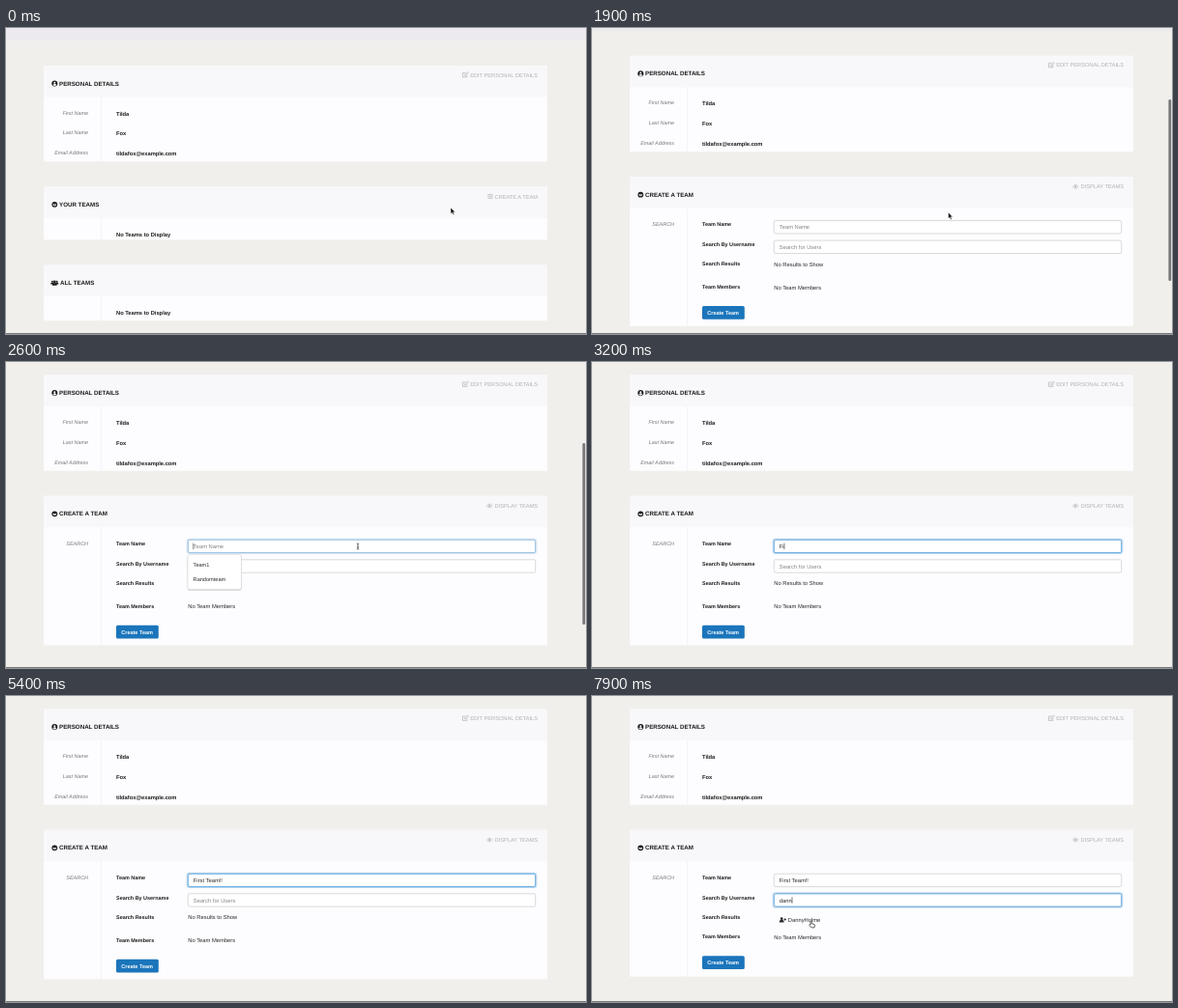
An HTML page for the animation above (8000 ms loop, 600x317 px).

```html
<!DOCTYPE html>
<html lang="en">
<head>
<meta charset="utf-8">
<title>Create a team</title>
<style>
  html, body { margin: 0; width: 100%; height: 100%; overflow: hidden; background: #f0efec; }
  svg { display: block; width: 600px; height: 317px; }
  text { font: 5.8px "Liberation Sans", Arial, sans-serif; fill: #2a2a2a; text-rendering: geometricPrecision; white-space: pre; }
  .head { font-size: 6.2px; font-weight: bold; fill: #1c1c1c; }
  .link { font-size: 5.68px; text-anchor: end; fill: #b3b1b4; }
  .side { font-size: 5.45px; font-style: italic; text-anchor: end; fill: #77757a; }
  .bold { font-size: 5.75px; font-weight: bold; fill: #1c1c1c; }
  .label { font-size: 5.45px; font-weight: bold; fill: #1c1c1c; }
  .hint { fill: #858585; }
  .item { font-size: 5.6px; }
  .button { font-size: 5.5px; font-weight: bold; fill: #fff; }
  .hover { fill: #858387; }
</style>
</head>
<body>
<svg id="stage" viewBox="0 0 600 317"></svg>
<script>
const LOOP = 8000, SCROLL = 25.5;
const OPEN = 1000, FOCUS_NAME = 2500, FOCUS_USER = 5600, RESULTS = 7050;
const stage = document.getElementById('stage');

// Time of each key press
const teamName = 'First Team!!';
const nameKeys = [...Array.from({ length: 10 }, (_, i) => 3000 + i * 120), 4500, 4700];
const userName = 'dann';
const userKeys = [6500, 6700, 6800, 6900];

const pointer = [
  [0, 460, 186], [100, 460, 186], [700, 518, 173.5], [1250, 518, 173.5],
  [1620, 368.5, 191], [2250, 368.5, 191], [2450, 364, 191],
  [7150, 364, 191], [7700, 226, 233]
];

const clamp = v => Math.max(0, Math.min(1, v));
const ramp = (t, start, end) => clamp((t - start) / (end - start));
const ease = v => v * v * (3 - 2 * v);
const typed = (text, keys, t) => text.slice(0, keys.filter(k => k <= t).length);

function pointerAt(t) {
  const i = pointer.findIndex(p => p[0] > t);
  if (i < 0) return pointer.at(-1).slice(1);
  const [a, b] = [pointer[i - 1], pointer[i]];
  const k = ease(ramp(t, a[0], b[0]));
  return [a[1] + (b[1] - a[1]) * k, a[2] + (b[2] - a[2]) * k];
}

// y is the vertical middle of the capitals
const text = (x, y, s, cls = '') => `<text x="${x}" y="${y + 2.05}" class="${cls}">${s}</text>`;
const rect = (x, y, w, h, fill, more = '') =>
  `<rect x="${x}" y="${y}" width="${w}" height="${h}" fill="${fill}" ${more}/>`;
const at = (x, y, body) => `<g transform="translate(${x} ${y})">${body}</g>`;
const line = (d, color, w) => `<path d="${d}" fill="none" stroke="${color}" stroke-width="${w}"/>`;

const person = '<circle cy="-1.3" r="1.4"/><path d="M-2.4 2.4v-1a1.6 1.6 0 0 1 1.6-1.5h1.6a1.6 1.6 0 0 1 1.6 1.5v1z"/>';
const icons = {
  user: '<circle r="3" fill="#1c1c1c"/><circle cy="-.8" r="1.05" fill="#f8f7f9"/><path d="M-1.8 1.8q0-1.5 1.8-1.5t1.8 1.5q-1.8 1.2-3.6 0z" fill="#f8f7f9"/>',
  team: '<circle r="2.9" fill="#1c1c1c"/><path d="M-1.9-.3h3.8q-.2 2-1.9 2t-1.9-2z" fill="#f8f7f9"/><circle cy=".4" r=".5" fill="#1c1c1c"/>',
  group: `<g fill="#1c1c1c">${at(-2.4, -.3, `<g transform="scale(.7)">${person}</g>`)}${at(2.4, -.3, `<g transform="scale(.7)">${person}</g>`)}${at(0, .3, person)}</g>`,
  edit: c => line('M1.6 .6v1.8h-4.4v-4.4h2.8M-.8 .8l.2-1.2 2.7-2.5 1 1-2.7 2.5z', c, .7),
  plus: c => line('M-2.1-2.1h4.2v4.2h-4.2zM0-1.3v2.6M-1.3 0h2.6', c, .6),
  eye: c => line('M-2.9 0q2.9-3.8 5.8 0q-2.9 3.8-5.8 0z', c, .6) + `<circle r="1.1" fill="${c}"/>`,
  addUser: `<g fill="#2a2a2a">${at(-.8, 0, person)}</g>` + line('M1.4-.5h2.6M2.7-1.8v2.6', '#2a2a2a', .8)
};

const cursors = {
  arrow: '<path d="M0 0v6.6l1.5-1.4 1 2.3 1.2-.5-1-2.2h2z" fill="#111" stroke="#fff" stroke-width=".5"/>',
  hand: '<path d="M0 .7q.6-1 1.2 0v2.1l2.7.6q.8.3.6 1.3l-.5 2.2h-3l-2.2-2.7q0-1 1.2-.2z" fill="#fff" stroke="#222" stroke-width=".7"/>',
  beam: line('M-1.2-3q1 0 1.2.6q.2-.6 1.2-.6M-1.2 3q1 0 1.2-.6q.2.6 1.2.6M0-2.4v4.8M-.7 .8h1.4', '#222', .7)
};

function panel(y, height, icon, title) {
  return rect(39, y, 521, height, '#fdfcfe') + rect(39, y, 521, 32.5, '#f8f7f9') +
    rect(98, y + 32.5, .6, height - 32.5, '#efedf1') +
    at(50.3, y + 18.5, icons[icon]) + text(icon === 'group' ? 56 : 55, y + 18.5, title, 'head');
}

function link(x, y, icon, label, hover) {
  return at(x, y, icons[icon](hover ? '#858387' : '#b3b1b4')) +
    `<g>${text(550, y, label, 'link' + (hover ? ' hover' : ''))}</g>`;
}

function field(y, value, hint, glow, caret) {
  const box = 'rx="1.6" stroke="';
  const ring = glow ? rect(187.2, y - 7.6, 361.6, 15.2, 'none', `rx="2.4" stroke="#66afe9" stroke-width="1.2" opacity="${glow * .4}"`) : '';
  const focus = glow ? rect(188.3, y - 6.7, 359.4, 13.4, 'none', `${box}#58a8e4" stroke-width=".9" opacity="${glow}"`) : '';
  return ring + rect(188.3, y - 6.7, 359.4, 13.4, '#fff', `${box}#cbcacc" stroke-width=".7"`) + focus +
    `<text x="193.8" y="${y + 2.05}" class="${value ? '' : 'hint'}">${value || hint}</text>` +
    (caret ? `<path data-caret d="M193.8 ${y - 3.2}v6.4" stroke="#222" stroke-width=".6"/>` : '');
}

function dropdown(y, width, items) {
  const h = items.length * 15 + 6;
  return rect(187.6, y + .6, width + .8, h + .8, '#000', 'rx="2" opacity=".12"') +
    rect(188, y, width, h, '#fff', 'rx="1.6" stroke="#cfced0" stroke-width=".5"') +
    items.map((s, i) => text(193.6, y + 10 + i * 15, s, 'item')).join('');
}

const details = panel(39, 99.3, 'user', 'PERSONAL DETAILS') +
  link(475.3, 48.5, 'edit', 'EDIT PERSONAL DETAILS') +
  [['First Name', 'Tilda'], ['Last Name', 'Fox'], ['Email Address', 'tildafox@example.com']]
    .map(([k, v], i) => text(85, 87.5 + i * 20.8, k, 'side') + text(114, 88.6 + i * 20.8, v, 'bold')).join('');

function teamLists(hover) {
  return panel(164.3, 55, 'team', 'YOUR TEAMS') + link(501, 174.5, 'plus', 'CREATE A TEAM', hover) +
    text(114, 214, 'No Teams to Display', 'bold') +
    panel(245.5, 57.7, 'group', 'ALL TEAMS') + text(114, 295, 'No Teams to Display', 'bold');
}

function teamForm(t, hover) {
  const found = t >= RESULTS, lift = found ? 3.5 : 0;
  const glowUser = ramp(t, FOCUS_USER, FOCUS_USER + 150);
  const glowName = ramp(t, FOCUS_NAME, FOCUS_NAME + 180) * (1 - glowUser);
  const lastEvent = Math.max(...[FOCUS_NAME, FOCUS_USER, ...nameKeys, ...userKeys].filter(k => k <= t), 0);
  const blink = (t - lastEvent) % 1000 < 500;
  const inUser = t >= FOCUS_USER, inName = t >= FOCUS_NAME && !inUser;
  return panel(164.3, 154.7 - lift * .8, 'team', 'CREATE A TEAM') +
    link(500.2, 174.5, 'eye', 'DISPLAY TEAMS', hover) +
    text(85, 213, 'SEARCH', 'side') +
    text(114, 213.3, 'Team Name', 'label') + text(114, 234, 'Search By Username', 'label') +
    text(114, 254.3, 'Search Results', 'label') + text(114, 278.3 - lift, 'Team Members', 'label') +
    field(216.4, typed(teamName, nameKeys, t), 'Team Name', glowName, inName && blink) +
    field(237, typed(userName, userKeys, t), 'Search for Users', glowUser, inUser && blink) +
    (found ? at(197, 257.5, icons.addUser) + text(202.8, 257.5, 'DannyHolme')
           : text(188.3, 254.8, 'No Results to Show')) +
    text(188.3, 278.7 - lift, 'No Team Members') +
    rect(114, 298.2 - lift, 43.8, 13.8, '#1b75bb', 'rx="1.6"') +
    text(119.3, 305.1 - lift, 'Create Team', 'button');
}

function suggestions(t) {
  if (t >= FOCUS_NAME + 50 && t < nameKeys[0]) return dropdown(199.5, 55.5, ['Team1', 'Randomteam']);
  const count = typed(userName, userKeys, t).length;
  if (count === 1 || count === 2) return dropdown(219.8, 30.4, ['dan', 'Da', 'Dan']);
  return count === 3 ? dropdown(219.8, 30.4, ['dan', 'Dan']) : '';
}

function mouse(t, x, y, scroll, overLink) {
  if (t >= nameKeys[0] && t < 7150) return '';
  const inField = t >= OPEN && x > 188 && x < 548 &&
    [216.4, 237].some(c => Math.abs(y - c + scroll) < 7);
  const overResult = t >= RESULTS && x < 237 && Math.abs(y - 232) < 4;
  const kind = overLink || overResult ? 'hand' : inField ? 'beam' : 'arrow';
  return at(x, y, cursors[kind]);
}

function draw(now) {
  const t = now % LOOP;
  const k = ramp(t, 1750, 2350);
  const scroll = SCROLL * (1 - (1 - k) ** 1.75);
  const [x, y] = pointerAt(t);
  const overLink = x > 497 && x < 551 && Math.abs(y - 174.5) < 5 && t < 1700;
  const barAlpha = t < 1750 ? 0 : 1 - ramp(t, 2750, 3000);

  stage.innerHTML = rect(0, 0, 600, 317, '#f0efec') +
    at(0, -scroll, rect(0, 0, 600, 13, '#eceaef') + details +
      (t < OPEN ? teamLists(overLink) : teamForm(t, overLink))) +
    suggestions(t) +
    rect(596.4, 67.5 + scroll * .65, 2.8, 188, '#77767a', `rx="1.4" opacity="${barAlpha}"`) +
    rect(0, 316, 600, 1, '#77767a') +
    mouse(t, x, y, scroll, overLink);

  // Put the caret after the typed text
  const caret = stage.querySelector('[data-caret]');
  if (caret) {
    const label = caret.previousElementSibling;
    const empty = label.classList.contains('hint');
    caret.setAttribute('transform', `translate(${empty ? 0 : label.getComputedTextLength() + .3} 0)`);
  }
  requestAnimationFrame(draw);
}
requestAnimationFrame(draw);
</script>
</body>
</html>
```
